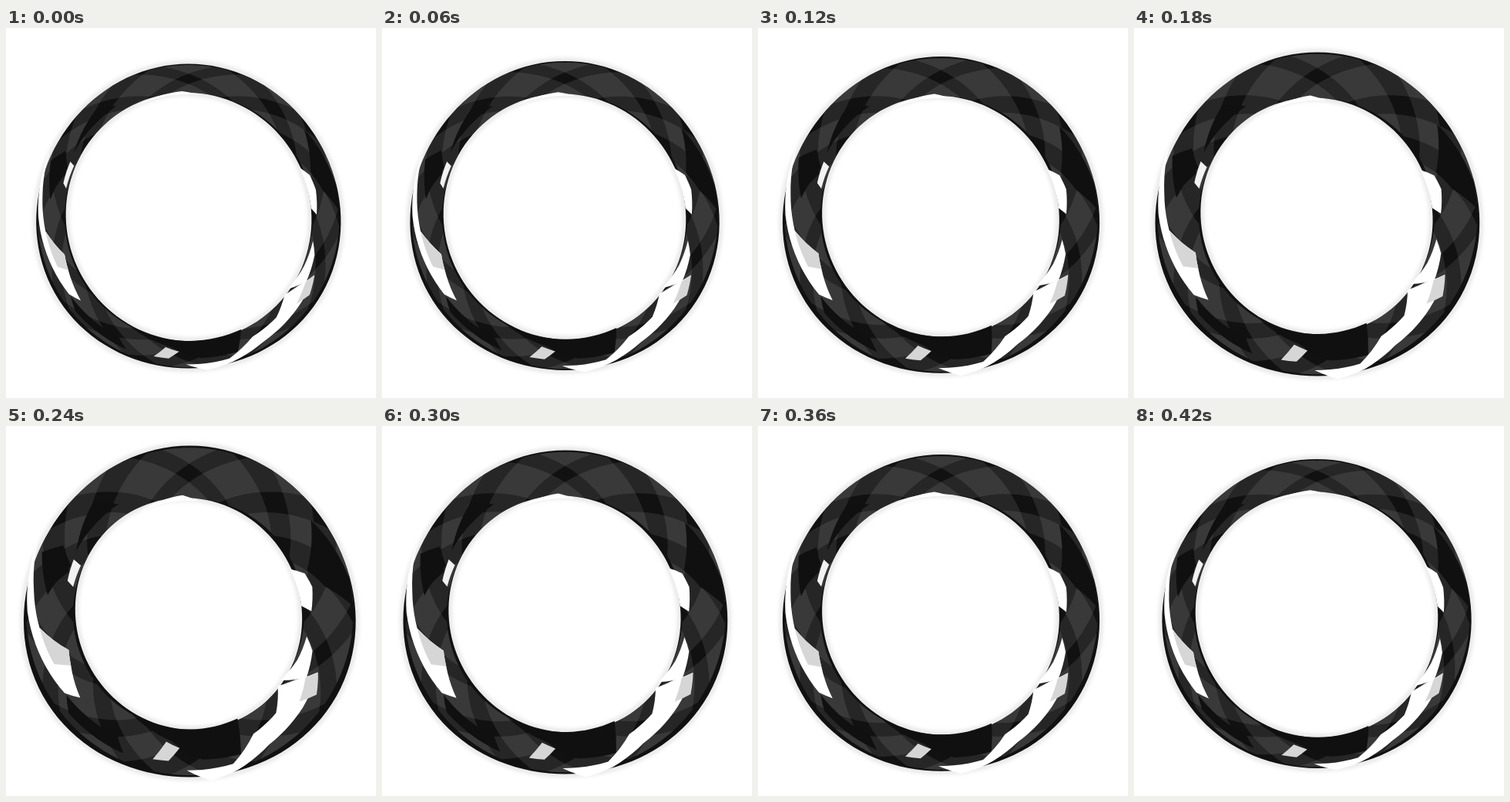
These frames come from a looping animation (480x480 px, 0.48 s). An HTML page with a canvas:

```html
<!DOCTYPE html>
<html lang="en">
<head>
<meta charset="utf-8">
<title>Brush ring</title>
<style>
html, body { margin: 0; width: 100%; height: 100%; overflow: hidden; background: #fff; }
canvas { display: block; width: 480px; height: 480px; }
</style>
</head>
<body>
<canvas id="stage" width="480" height="480"></canvas>
<script>
const ctx = document.getElementById('stage').getContext('2d');
const STEP = 60;
const SWELL = [0, .17, .45, .72, 1, .72, .45, .17];

// Inner and outer circles as [x, y, radius], thin and thick.
const THIN = { inner: [237, 245, 161], outer: [236.8, 244, 197.5] };
const THICK = { inner: [237, 243.5, 150], outer: [238.3, 240.5, 215] };

const mix = (a, b, t) => a + (b - a) * t;
const mixAll = (a, b, t) => a.map((v, i) => mix(v, b[i], t));
const sin = degrees => Math.sin(degrees * Math.PI / 180);
const cos = degrees => Math.cos(degrees * Math.PI / 180);

// Shapes are corners [degrees, depth]: depth 0 is the inner edge, 1 the outer.
// Their sides bend along the ring.
const bend = corners => corners.flatMap((from, i) => {
  const to = corners[(i + 1) % corners.length];
  const parts = Math.ceil(Math.abs(to[0] - from[0]) / 3) || 1;
  return Array.from({ length: parts }, (_, k) => mixAll(from, to, k / parts));
});
const patch = text => bend(text.split(' ').map(p => p.split(',').map(Number)));
const ribbon = (middle, lean, width) => {
  const [start, end] = [middle - (lean + width) / 2, middle + (lean - width) / 2];
  return bend([[start, 0], [start + width, 0], [end + width, .96], [end, .96]]);
};

// Slightly hand-drawn edges
const turn = Array.from({ length: 120 }, (_, i) => i * 3);
const rim = turn.map(a => [a, 1 + .05 * (sin(a) + sin(3 * a))]);
const hole = turn.map(a => [a, .05 * sin(2 * a - 30) - .02]);

// Two families of translucent ribbons cross in lighter diamonds.
const layers = [];
for (let a = 0; a < 360; a += 36) {
  for (const lean of [30, -30]) {
    layers.push(['rgba(255,255,255,.09)', ribbon(a, lean, 22 + 5 * sin(a * 3))]);
  }
}

const add = (color, ...patches) => patches.forEach(p => layers.push([color, patch(p)]));
add('#101010',
  '-37,.73 -11,.95 -2,.95 -11,.45 -20,.2',
  '202,.87 208,.54 202,.23 187,.54',
  '229,.61 237,.28 209,.26',
  '146,.65 120,.55 115,.81 140,.84',
  '119,0 98,.27 85,.64 70,.71 65,0');
add('#fff',
  '206,1.04 180,.93 147,.66 142,.45 156,.27 163,.2 174,.7 188,.83',
  '91,.86 74,.85 62,.43 49,.34 39,-.02 32,.2 25,.52 40,.65 59,.78 73,1 83,1.1',
  '-24,-.1 -19,.14 -12,.21 -1,.14 -4,-.05',
  '11,.09 17,.27 29,.37 36,-.05 23,.05',
  '-118,-.05 -93,.06 -85,-.05');
add('#d6d6d6',
  '174,.7 163,.2 156,.27 159,.58',
  '104,.72 100,.3 94,.4 98,.69',
  '25,.53 33,.72 39,.52 29,.35');
add('#f2f2f2', '195,.2 205,.23 204,.05 193,.06');

function draw(swell) {
  const inner = mixAll(THIN.inner, THICK.inner, swell);
  const outer = mixAll(THIN.outer, THICK.outer, swell);
  const trace = shape => {
    shape.forEach(([angle, depth], i) => {
      const [x, y, r] = mixAll(inner, outer, depth);
      ctx[i ? 'lineTo' : 'moveTo'](x + r * cos(angle), y + r * sin(angle));
    });
    ctx.closePath();
  };

  ctx.filter = 'none';
  ctx.fillStyle = '#fff';
  ctx.fillRect(0, 0, 480, 480);

  ctx.beginPath();
  trace(rim);
  trace(hole);
  ctx.filter = 'blur(2px)';
  ctx.strokeStyle = 'rgba(0,0,0,.08)';
  ctx.lineWidth = 10;
  ctx.stroke();
  ctx.filter = 'blur(.7px)';
  ctx.fillStyle = '#111';
  ctx.fill('evenodd');

  for (const [color, shape] of layers) {
    ctx.beginPath();
    trace(shape);
    ctx.fillStyle = color;
    ctx.fill();
  }
}

let shown = -1;
function tick() {
  const pose = Math.floor(performance.now() / STEP) % SWELL.length;
  if (pose !== shown) draw(SWELL[shown = pose]);
  requestAnimationFrame(tick);
}
tick();
</script>
</body>
</html>
```
